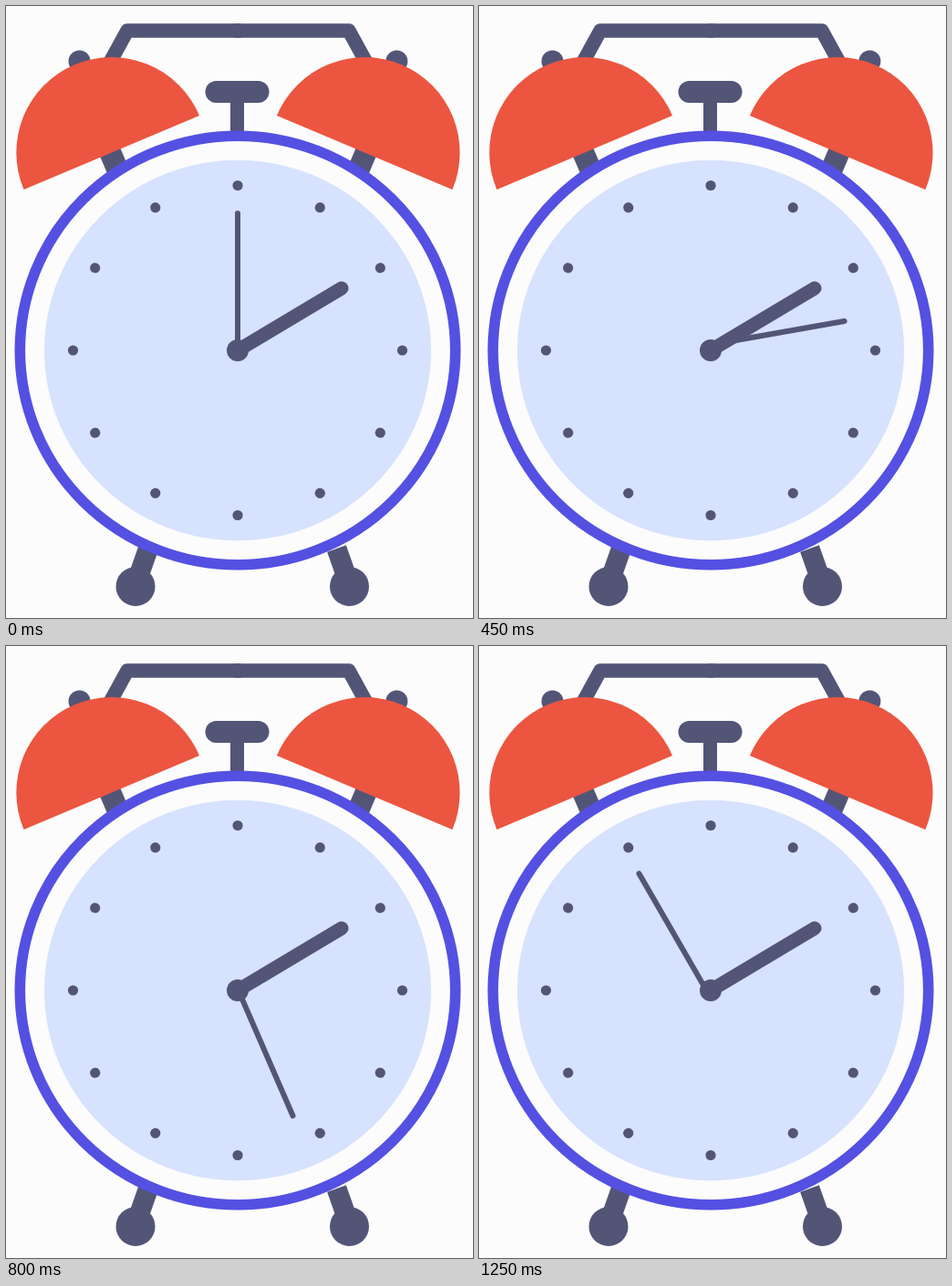
These frames come from a looping animation (512x670 px, 1.3 s). An HTML page:

```html
<!DOCTYPE html>
<html lang="en">
<head>
<meta charset="utf-8">
<title>Alarm clock</title>
<style>
  html, body { margin: 0; width: 100%; height: 100%; overflow: hidden; background: #fcfcfc; }
  svg { display: block; width: 512px; height: 670px; }
  .line { fill: none; stroke: #535577; }
  .dark { fill: #535577; }
  .bell { fill: #ec5540; }
  .round { stroke-linecap: round; stroke-linejoin: round; }
</style>
</head>
<body>
<svg viewBox="0 0 512 670">
  <g id="top">
    <path class="line round" stroke-width="15.5" d="M111 67 133 27H256"/>
    <circle class="dark" cx="80.5" cy="60.5" r="12"/>
    <path class="line" stroke-width="24" d="M112 155 124 183"/>
    <path class="bell" d="M19.5 201A104.4 104.4 0 0 1 212 120Z"/>
  </g>
  <use href="#top" transform="translate(508.9) scale(-1 1)"/>
  <g id="foot">
    <path class="line" stroke-width="22" d="M156 594 144 628"/>
    <circle class="dark" cx="142" cy="635.5" r="21.5"/>
  </g>
  <use href="#foot" transform="translate(518.5) scale(-1 1)"/>
  <path class="line" stroke-width="15" d="M253.5 140V100"/>
  <rect class="dark" x="218.5" y="82" width="70" height="24" rx="12"/>
  <ellipse cx="254" cy="377" rx="238.7" ry="234.8" fill="#fcfcfc" stroke="#5450e2" stroke-width="11.6"/>
  <ellipse cx="254" cy="377" rx="212" ry="208.3" fill="#d6e2fe"/>
  <g transform="translate(254 377)">
    <g id="marks" class="dark"></g>
    <path id="minute" class="line round" stroke-width="6" d="M0 0V-150"/>
    <path class="line round" stroke-width="15" d="M0 0 114-68"/>
    <circle class="dark" r="12"/>
  </g>
</svg>
<script>
  const LOOP = 1300, TICK = 50;
  const marks = document.getElementById('marks');
  const minute = document.getElementById('minute');

  for (let i = 0; i < 12; i++) {
    marks.innerHTML += `<circle cy="-180.5" r="5.6" transform="rotate(${i * 30})"/>`;
  }

  // [tick, angle]: the hand slows, then speeds up until the loop ends
  const keys = [[0, 0], [5, 50.5], [9, 80], [13, 119.5], [16, 156.5], [25, 330]];

  function angleAt(tick) {
    const next = Math.max(1, keys.findIndex(([t]) => t >= tick));
    const [t0, a0] = keys[next - 1], [t1, a1] = keys[next];
    return a0 + (a1 - a0) * (tick - t0) / (t1 - t0);
  }

  // the loose hand sways sideways under the hub
  const swayAt = tick => 3.5 * (Math.cos(2 * Math.PI * tick / 14.5) - 1);

  const start = performance.now();
  function draw() {
    const tick = Math.floor((performance.now() - start) % LOOP / TICK);
    minute.setAttribute('transform', `rotate(${angleAt(tick)}) translate(${swayAt(tick)} 0)`);
    requestAnimationFrame(draw);
  }
  draw();
</script>
</body>
</html>
```
